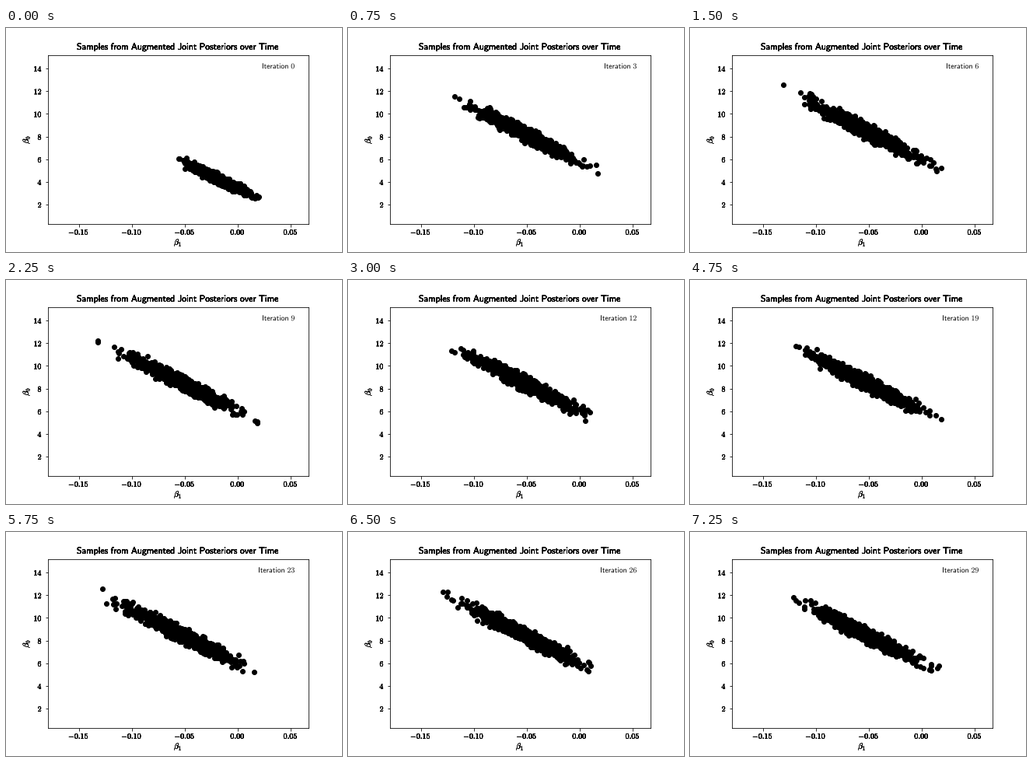
Write a matplotlib script that moves like this. It is 432 by 288 pixels and loops after 7.5 s.

```python
import numpy as np
import matplotlib.pyplot as plt
from matplotlib.animation import FuncAnimation
from matplotlib.patheffects import Normal

FRAMES, STEP_MS = 30, 250
SAMPLES = 1000

# Mean slope, mean intercept, slope spread, regression, residual spread
START = np.array([-0.0200, 4.33, 0.0125, -44.8, 0.19])
SETTLED = np.array([-0.0535, 8.55, 0.0225, -46.8, 0.29])
DECAY = 0.45  # share of the starting bias left after each iteration

plt.rcParams.update({
    "figure.dpi": 72,
    "mathtext.fontset": "cm",
    "font.size": 10,
})


def sans(text):
    return r"$\mathsf{" + text.replace(" ", r"\ ") + "}$"


def draw_samples(i):
    """Joint draws of (slope, intercept) at iteration i."""
    rng = np.random.default_rng(100 + i)
    mean1, mean0, spread, slope, noise = SETTLED + (START - SETTLED) * DECAY**i
    z, e = rng.standard_normal((2, SAMPLES))
    b1 = mean1 + spread * z.clip(-3.5, 3.2)
    b0 = mean0 + slope * (b1 - mean1) + noise * e.clip(-2.8, 2.8)
    return b1, b0


fig = plt.figure(figsize=(6, 4), facecolor="white")
ax = fig.add_axes([0.125, 0.125, 0.775, 0.755])
ax.set_xlim(-0.179, 0.0666)
ax.set_ylim(0.285, 15.2)

xticks = [-0.15, -0.10, -0.05, 0, 0.05]
yticks = range(2, 15, 2)
ax.set_xticks(xticks, [f"${v:.2f}$" for v in xticks])
ax.set_yticks(yticks, [f"${v}$" for v in yticks], va="center")
ax.tick_params(axis="x", pad=0.2)
ax.set_xlabel(r"$\beta_1$", labelpad=1.2)
ax.set_ylabel(r"$\beta_0$", labelpad=2)
ax.set_title(sans("Samples from Augmented Joint Posteriors over Time"),
             fontsize=11.8, pad=6.8)

# Repeated passes give the fixed lettering its heavier edges
heavy = [Normal()] * 6
for label in [ax.title, ax.xaxis.label, ax.yaxis.label,
              *ax.get_xticklabels(), *ax.get_yticklabels()]:
    label.set_path_effects(heavy)

dots, = ax.plot([], [], "ko", ms=6)
counter = ax.text(0.952, 0.965, "", transform=ax.transAxes, fontsize=9.8,
                  ha="right", va="top", path_effects=[Normal()])


def update(i):
    dots.set_data(*draw_samples(i))
    counter.set_text(sans(f"Iteration {i}"))
    return dots, counter


anim = FuncAnimation(fig, update, frames=FRAMES, interval=STEP_MS,
                     repeat=True, repeat_delay=0)
plt.show()
```
